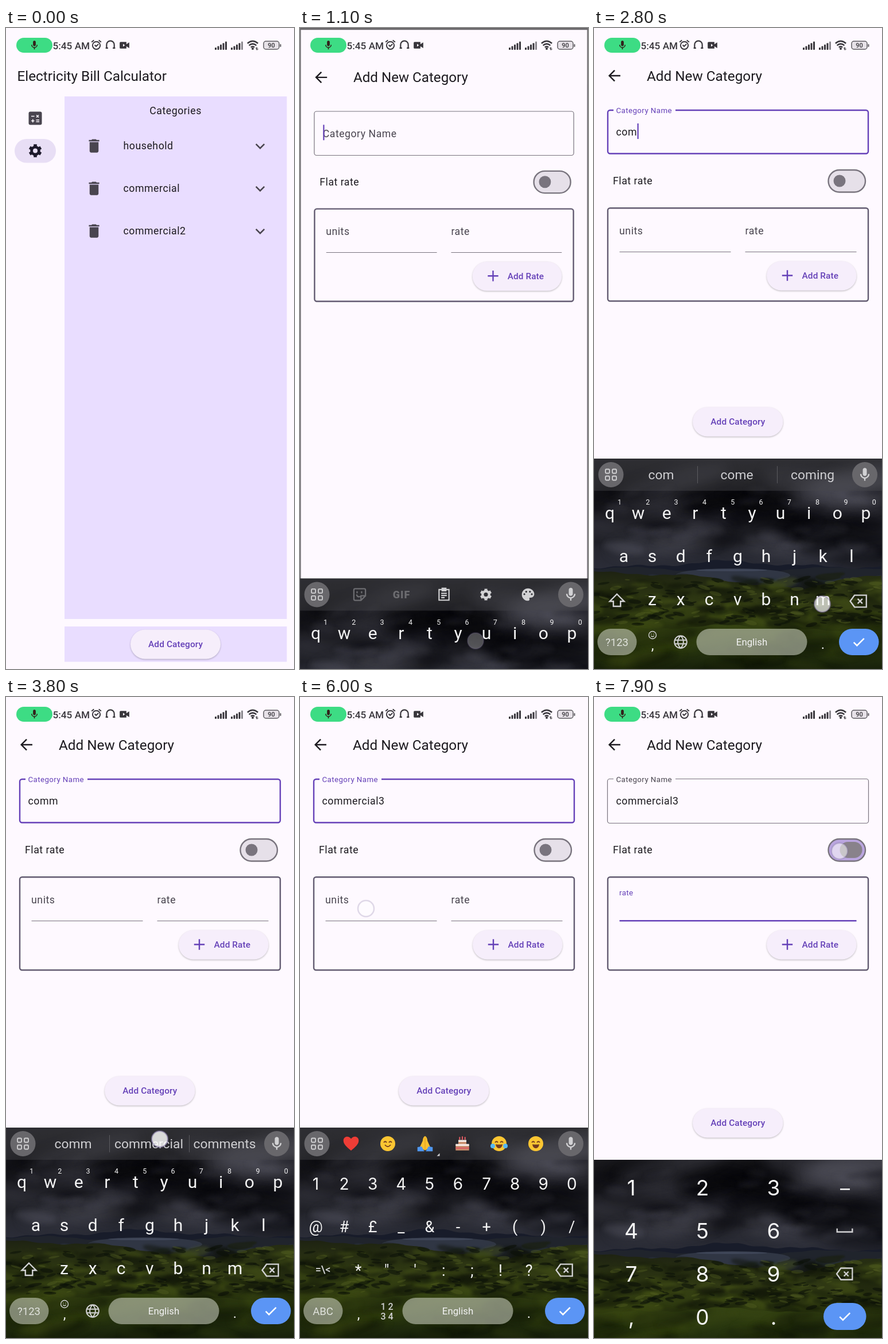
An HTML page with a canvas that plays this animation: 502x1115 px, repeating every 8 s.

```html
<!DOCTYPE html>
<html lang="en">
<head>
<meta charset="utf-8">
<title>Electricity Bill Calculator</title>
<style>
html, body { margin: 0; width: 100%; height: 100%; overflow: hidden; background: #fef9ff; }
canvas { display: block; }
</style>
</head>
<body>
<canvas id="stage" width="502" height="1115"></canvas>
<script>
const W = 502, H = 1115, LOOP = 8000, STEP = 100;
const BG = '#fef9ff', PANEL = '#e9ddff', PRIMARY = '#6541b8', INK = '#1d1b20', SOFT = '#49454f',
  OUTLINE = '#79747e', BOX = '#625b71', BUTTON = '#f6eefb', KEY = '#f4f4f4', DIM = '#6c6c70', LIGHT = '#d2d2d4';
const TITLE = 24.3, BODY = 17.7, SMALL = 13.3, SPACING = .55;
const stage = document.getElementById('stage').getContext('2d');
let c = stage;

const clamp = v => Math.max(0, Math.min(1, v));
const mix = (a, b, p) => a + (b - a) * p;
const ease = (t, start, length) => 1 - (1 - clamp((t - start) / length)) ** 2;

// Text is placed by the middle of its capitals.
function text(s, x, y, size, color, align = 'left', weight = 400, spacing = 0, family = 'Roboto') {
  c.font = `${weight} ${size}px ${family}, sans-serif`;
  c.letterSpacing = spacing + 'px';
  c.textAlign = align;
  c.fillStyle = color;
  c.fillText(s, x, y + size * .355);
}
const body = (s, x, y, color = INK, align) => text(s, x, y, BODY, color, align, 400, SPACING);

function box(x, y, w, h, r, fill, stroke, width = 1) {
  c.beginPath();
  c.roundRect(x, y, w, h, r);
  if (fill) { c.fillStyle = fill; c.fill(); }
  if (stroke) { c.strokeStyle = stroke; c.lineWidth = width; c.stroke(); }
}
const disc = (x, y, r, fill, stroke, width) => box(x - r, y - r, 2 * r, 2 * r, r, fill, stroke, width);

// Icons use a 24-unit grid; a line width means stroke instead of fill.
function icon(d, x, y, size, color, width) {
  c.save();
  c.translate(x, y);
  c.scale(size / 24, size / 24);
  c.translate(-12, -12);
  const path = new Path2D(d);
  if (width) { c.strokeStyle = color; c.lineWidth = width; c.stroke(path); }
  else { c.fillStyle = color; c.fill(path, 'evenodd'); }
  c.restore();
}
const TRASH = 'M6 19c0 1.1.9 2 2 2h8c1.1 0 2-.9 2-2V7H6zM19 4h-3.5l-1-1h-5l-1 1H5v2h14z';
const MIC = 'M12 14c1.7 0 3-1.3 3-3V5c0-1.7-1.3-3-3-3S9 3.3 9 5v6c0 1.7 1.3 3 3 3zM17 11a5 5 0 0 1-10 0H5c0 3.5 2.6 6.4 6 6.9V21h2v-3.1c3.4-.5 6-3.4 6-6.9z';
const PALETTE = 'M12 2a10 10 0 1 0 0 20c2 0 3-2 2-4 0-1 0-1 2-1 4 0 6-3 6-6 0-5-5-9-10-9zM6 10a1.5 1.5 0 1 0 .1 0zM9 6a1.5 1.5 0 1 0 .1 0zM15 6a1.5 1.5 0 1 0 .1 0zM18 10a1.5 1.5 0 1 0 .1 0z';
const CHECK = 'M4 12.5l5 5L20 6.5';
const BACKSPACE = 'M7 4.5H22V19.5H7L1.5 12zM11 9l6 6M17 9l-6 6';
const GLOBE = 'M2 12a10 10 0 1 0 20 0a10 10 0 1 0-20 0zM2.5 9H21.5M2.5 15H21.5M12 2C6 8 6 16 12 22C18 16 18 8 12 2';

function gear(x, y, size, color) {
  const r = size / 24;
  c.strokeStyle = color;
  c.lineWidth = 4.3 * r;
  c.beginPath();
  c.arc(x, y, 5.7 * r, 0, 7);
  c.stroke();
  c.lineWidth = 5 * r;
  for (let i = 0; i < 6; i++) {
    const a = (i + .5) * Math.PI / 3, dx = Math.cos(a) * r, dy = Math.sin(a) * r;
    c.beginPath();
    c.moveTo(x + 6.5 * dx, y + 6.5 * dy);
    c.lineTo(x + 10 * dx, y + 10 * dy);
    c.stroke();
  }
}

function pillButton(x, y, w, label, plus) {
  c.save();
  c.shadowColor = 'rgba(0,0,0,.24)';
  c.shadowBlur = 3;
  c.shadowOffsetY = 1.2;
  box(x, y - 25.5, w, 51, 25.5, BUTTON);
  c.restore();
  if (plus) icon('M12 3.5V20.5M3.5 12H20.5', x + 36, y - .5, 26, PRIMARY, 2.2);
  text(label, plus ? x + 61.5 : x + w / 2, y, 15.4, PRIMARY, plus ? 'left' : 'center', 500, .1);
}

function statusBar() {
  const ink = '#38363b';
  box(18, 17, 63, 26, 13, '#3ddc84');
  icon(MIC, 49.5, 30, 19, '#33211b');
  text('5:45 AM', 81.5, 30.5, 17.2, ink, 'left', 500);
  icon('M4 13a8 8 0 1 0 16 0a8 8 0 1 0-16 0zM8.5 12l3 3 5-5M2 6l5-4M22 6l-5-4', 157.5, 29.5, 20, ink, 2.3);
  icon('M4 18V12a8 8 0 0 1 16 0V18M2 19H7M17 19H22', 182, 29, 20, ink, 2.6);
  icon('M4 5H16V10L22 6V18L16 14V19H4Q2 19 2 17V7Q2 5 4 5zM9 9V15L13 12z', 206.5, 30, 20, ink);
  for (const x of [364, 392])
    for (let i = 0; i < 5; i++) box(x + i * 4.5, 34 - i * 2.6, 3, 4 + i * 2.6, 1, i > 3 && x > 380 ? '#8a878d' : ink);
  icon('M2 9.5Q12 1 22 9.5M5 13.5Q12 7.5 19 13.5M8.5 17Q12 14 15.5 17', 430, 29, 22, ink, 2.7);
  disc(430, 36, 2, ink);
  icon('M4 10L8 3V21M14 3V21L20 14', 437.5, 36, 6, ink, 4);
  box(449, 23, 27, 14, 4, '#e7e2e8', '#5d5b60', 1.5);
  box(477.5, 28, 2, 5, 1, '#5d5b60');
  text('90', 462.5, 30, 11, ink, 'center', 500);
}

function listPage() {
  box(0, 0, W, H, 0, BG);
  text('Electricity Bill Calculator', 19.5, 83, TITLE, INK);
  box(39.5, 145.5, 23, 23, 3, SOFT);
  icon('M5 8.5H10.5M14 6.5l4 4M18 6.5l-4 4M5 16.5H10.5M7.75 13.75V19.25M13.5 15H19M13.5 18H19', 51, 157, 24, BG, 1.7);
  box(15, 193, 72, 41.5, 21, '#e8def5');
  gear(51, 213.5, 27, '#1d192b');
  box(102, 119, 387.5, 909, 0, PANEL);
  box(102, 1041, 387.5, 61.5, 0, PANEL);
  body('Categories', 295.5, 144, INK, 'center');
  ['household', 'commercial', 'commercial2'].forEach((name, i) => {
    const y = 205 + i * 74;
    icon(TRASH, 153.5, y, 31, SOFT);
    body(name, 204.5, y);
    icon('M5 9l7 7 7-7', 443, y, 25, SOFT, 2.5);
  });
  pillButton(217, 1072, 157, 'Add Category');
}

const EDITS = [[0, ''], [2100, 'c'], [2450, 'co'], [2750, 'com'], [3000, 'comm'], [3950, 'commercial'], [5300, 'commercial3']];
const FOCUS_NAME = 1130, FOCUS_UNITS = 6100, FLAT = 7850;
const latest = (list, t) => list.filter(v => v <= t).pop();
const typed = t => EDITS.filter(e => e[0] <= t).pop()[1];
const cursorOn = t => Math.floor((t - latest([1000, ...EDITS.slice(1).map(e => e[0]), FOCUS_UNITS], t)) / 500) % 2 === 0;

function floating(s, x, rest, top, p, color) {
  const size = mix(BODY, SMALL, p);
  text(s, x, mix(rest, top, p), size, color, 'left', 400, size * .0315);
}
function underline(x, w, active) {
  box(x, active ? 388 : 389, w, active ? 2.4 : 1, 0, active ? PRIMARY : OUTLINE);
}

function toggle(t) {
  const p = clamp((t - FLAT) / 100), grow = Math.sin(Math.PI * p);
  box(408.5, 247, 64.5, 38.5, 19.5, p ? '#baa5df' : '#e6e0e9', OUTLINE, 2.4);
  const hw = 10.5 + 9 * grow, hh = 10.5 + 3.5 * grow;
  box(428 + 40 * p - hw, 266 - hh, 2 * hw, 2 * hh, hh, p ? '#89828b' : OUTLINE);
}

function formPage(t) {
  box(0, 0, W, H, 0, BG);
  icon('M20.5 12H4.5M12 4L4 12l8 8', 36, 83, 28, INK, 2.1);
  text('Add New Category', 92, 83, TITLE, INK);

  const inName = t >= FOCUS_NAME && t < FOCUS_UNITS, name = typed(t);
  const up = clamp((t - FOCUS_NAME) / 167);
  if (inName) box(24, 143, 454, 75.5, 4, null, PRIMARY, 2.4);
  else box(23.5, 142.5, 455, 77, 4, null, OUTLINE, 1.2);
  if (up) box(34, 139, 108 * up, 8, 0, BG);
  floating('Category Name', 38.5, 181, 143, up, inName ? PRIMARY : SOFT);
  body(name, 38.5, 181);
  const nameEnd = name ? 39 + c.measureText(name).width : 39;
  if (t >= 1000 && t < FOCUS_UNITS && cursorOn(t)) box(nameEnd, 166, 2.2, 27, 0, PRIMARY);

  body('Flat rate', 33, 266);
  toggle(t);

  box(24, 313.2, 454, 161.8, 4, null, BOX, 2.4);
  if (t >= FLAT) {
    underline(44.5, 413, true);
    floating('rate', 44, 353, 340, 1, PRIMARY);
  } else {
    const inUnits = t >= FOCUS_UNITS;
    underline(44.5, 194, inUnits);
    underline(263.5, 194);
    floating('units', 44, 353, 340, clamp((t - FOCUS_UNITS) / 167), inUnits ? PRIMARY : SOFT);
    body('rate', 263.5, 353, SOFT);
  }
  if (t >= FOCUS_UNITS && cursorOn(t)) box(45, 348, 2.2, 26, 0, PRIMARY);
  pillButton(301, 431, 156.5, 'Add Rate', true);
  pillButton(172, 1051 - 366 * ease(t, 1150, 250) + 56 * ease(t, 6150, 200), 157.5, 'Add Category');
}

// Dark clouds over a lake and green hills, painted once.
function paintScenery() {
  const canvas = document.createElement('canvas');
  canvas.width = W;
  canvas.height = 366;
  c = canvas.getContext('2d');
  let seed = 7;
  const random = () => (seed = seed * 16807 % 2147483647) / 2147483647;
  const gradient = (y0, y1, ...colors) => {
    const g = c.createLinearGradient(0, y0, 0, y1);
    colors.forEach((color, i) => g.addColorStop(i / (colors.length - 1), color));
    return g;
  };
  const blob = (x, y, w, h, color, tilt = 0) => {
    c.fillStyle = color;
    c.beginPath();
    c.ellipse(x, y, w, h, tilt, 0, 7);
    c.fill();
  };
  const scatter = (count, blur, y0, y1, size, colors) => {
    c.filter = `blur(${blur}px)`;
    for (let i = 0; i < count; i++) {
      const w = size * (.4 + random());
      blob(random() * W, mix(y0, y1, random()), w, w * (.15 + .2 * random()), colors[i % colors.length], random() * .6 - .3);
    }
    c.filter = 'none';
  };
  const ridge = (height, slope, amp, phase, fill) => {
    c.fillStyle = fill;
    c.beginPath();
    c.moveTo(0, 366);
    for (let x = 0; x <= W; x += 3)
      c.lineTo(x, height + slope * x + amp * (Math.sin(x / 63 + phase) + .5 * Math.sin(x / 25 + phase * 2) + .2 * Math.sin(x / 7)));
    c.lineTo(W, 366);
    c.fill();
  };
  box(0, 0, W, 366, 0, gradient(0, 195, '#1d1d21', '#17171b', '#1b1b21', '#25262d', '#2b2d38'));
  scatter(26, 10, 40, 165, 85, ['rgba(100,100,112,.24)', 'rgba(4,4,8,.36)']);
  scatter(60, 4, 50, 165, 30, ['rgba(105,105,118,.13)', 'rgba(4,4,8,.2)']);
  ridge(184, 0, 5, 1, '#181c2a');
  ridge(193, 0, 3, 4, '#20242c');
  blob(242, 203, 100, 12, '#303644');
  blob(240, 194, 62, 2, '#3f4658');
  scatter(16, 1, 203, 217, 18, ['#1c2119', '#2b3440']);
  ridge(194, .085, 4, 2, gradient(190, 290, '#1c2012', '#2c3512', '#36410f'));
  ridge(268, -.125, 4, 3, gradient(200, 300, '#252c12', '#3a4515'));
  ridge(252, .03, 5, 5, gradient(245, 310, '#374213', '#2a360f'));
  scatter(90, 2.5, 215, 292, 26, ['rgba(14,19,9,.5)', 'rgba(74,88,24,.42)', 'rgba(20,27,11,.5)']);
  scatter(200, .7, 208, 290, 9, ['rgba(11,16,8,.6)', 'rgba(84,97,34,.4)', 'rgba(14,20,9,.6)']);
  ridge(293, .008, 4, 1, gradient(285, 366, '#364413', '#28360f', '#18210b'));
  scatter(50, 4, 300, 366, 45, ['rgba(70,84,24,.16)', 'rgba(10,15,6,.25)']);
  c = stage;
  return canvas;
}
const scenery = paintScenery();

function face(x, y, open, tears) {
  const brown = '#713a20';
  disc(x, y, 13, '#fcc632');
  if (open) icon('M6 13Q12 14 18 13Q17 20 12 20Q7 20 6 13z', x, y, 24, brown);
  else icon('M7 14Q12 20 17 14', x, y, 24, brown, 1.8);
  icon('M5 10Q7.5 6.5 10 10M14 10Q16.5 6.5 19 10', x, y, 24, brown, 1.8);
  if (tears) for (const side of [-11, 11]) disc(x + side, y + 4, 4, '#55b7f2');
}
function emojis(y) {
  icon('M12 22C6 17 1 13 1 7.5C1 1 9 0 12 5C15 0 23 1 23 7.5C23 13 18 17 12 22z', 89, y, 29, '#ee3d36');
  face(153, y);
  icon('M12 1Q9 2 8.5 8L4 18 11 21H13L20 18 15.5 8Q15 2 12 1z', 218, y, 29, '#fbc02d');
  icon('M1 17L7 16 11 23H1zM23 17L17 16 13 23H23z', 218, y, 29, '#4f97ef');
  icon('M12 3V22', 218, y, 29, '#d99a23', .8);
  icon('M24 0V24H0z', 241, y + 19, 5, LIGHT);
  icon('M2 13H22V22H2zM6 7H18V13H6z', 283, y, 28, '#c98d6b');
  icon('M2 14H22M6 8H18', 283, y, 28, '#f6e9e2', 3);
  icon('M2 18.5H22M8 6V2M12 6V1M16 6V2', 283, y, 28, '#dc5a62', 1.8);
  face(347, y, true, true);
  face(411, y, true);
}

const GUESSES = { c: ['c', 'can', 'come'], co: ['co', 'come', 'could'], com: ['com', 'come', 'coming'], comm: ['comm', 'commercial', 'comments'] };
function toolStrip(t, y) {
  const words = typed(t);
  box(0, y - 28, W, 56, 0, 'rgba(70,70,74,.42)');
  for (const x of [29.5, 472]) disc(x, y, 22, '#68676b');
  for (const dx of [-6, 6]) for (const dy of [-6, 6]) box(29.5 + dx - 3.5, y + dy - 3.5, 7, 7, 1.5, null, LIGHT, 1.8);
  icon(MIC, 472, y, 28, LIGHT);
  if (!words) {
    icon('M5 3H19Q21 3 21 5V14L14 21H5Q3 21 3 19V5Q3 3 5 3zM14 21V14H21M7 12Q9 17 13 15M8 7V10M15 7V10', 104, y, 27, DIM, 2);
    text('GIF', 177, y, 18, DIM, 'center', 900, 1);
    icon('M4 4H20V21H4zM9 2H15V6H9zM7.5 10H16.5M7.5 13.5H16.5M7.5 17H13', 251, y, 26, LIGHT, 2);
    gear(324, y, 24, LIGHT);
    icon(PALETTE, 397.5, y, 26, LIGHT);
  } else if (GUESSES[words]) {
    GUESSES[words].forEach((word, i) => text(word, 117 + 132 * i, y, 22.8, '#cfcfd2', 'center'));
    for (const x of [180, 319]) box(x, y - 15, 1, 30, 0, 'rgba(255,255,255,.2)');
  } else emojis(y);
}

const PRESSES = [['c', 2000, 200.5, 995], ['o', 2350, 424, 846], ['m', 2650, 399, 995], ['m', 2900, 399, 995], ['3', 5200, 126, 846]];
const pressed = t => PRESSES.find(p => t >= p[1] && t < p[1] + 100);

function keyRow(keys, x, y, size, t, gap = 49.6, family) {
  const now = pressed(t);
  [...keys].forEach((k, i) =>
    text(k, x + gap * i, y, size, now && now[0] === k ? 'rgba(255,255,255,.35)' : KEY, 'center', 400, 0, family));
}
function enterKey(x, y, w, h) {
  box(x, y - h / 2, w, h, h / 2, '#5b95f5');
  icon(CHECK, x + w / 2, y, 27, '#fff', 2.2);
}

function wordKeys(t) {
  const symbols = t >= 4800, pale = 'rgba(190,195,180,.62)';
  if (symbols) {
    keyRow('1234567890', 27.5, 847, 28, t, 49.6, 'Inter');
    keyRow('@#£_&-+()/', 27.5, 921, 27, t);
    keyRow('*"\':;!?', 101.5, 997, 27, t);
    text('=\\<', 40, 996, 18, LIGHT, 'center', 500);
    text('1 2', 151.5, 1060, 16, LIGHT, 'center', 500);
    text('3 4', 151.5, 1077, 16, LIGHT, 'center', 500);
  } else {
    keyRow('qwertyuiop', 27.5, 843.5, 30, t);
    keyRow('1234567890', 44.5, 825, 12.5, 0, 49.3);
    keyRow('asdfghjkl', 52, 918.5, 30, t);
    keyRow('zxcvbnm', 101.5, 993.5, 30, t);
    icon('M12 3L22 13H17V20H7V13H2z', 40, 996, 30, LIGHT, 1.9);
    disc(102, 1056, 6.5, null, LIGHT, 1.4);
    icon('M7 14Q12 20 17 14M8 8V10M16 8V10', 102, 1056, 13, LIGHT, 2.5);
    icon(GLOBE, 151, 1068, 26, LIGHT, 1.8);
  }
  icon(BACKSPACE, 461, 997, 33, LIGHT, 1.7);
  box(6, 1045, 68.5, 46, 23, pale);
  text(symbols ? 'ABC' : '?123', 40, 1068, 18.5, '#e1e3dd', 'center');
  text(',', 102, 1073, 24, KEY, 'center');
  box(178.5, 1045, 193, 46, 23, pale);
  text('English', 275, 1068.5, 16.8, KEY, 'center');
  text('.', 399, 1071, 24, KEY, 'center');
  enterKey(427, 1068, 69.5, 46);
}

function numberKeys() {
  ['123', '456', '789', ',0.'].forEach((row, i) => keyRow(row, 65, 853.5 + 75 * i, 37, 0, 124, 'Inter'));
  box(429, 855, 17, 2.5, 0, KEY);
  icon('M1 9V14H23V9', 437, 928, 29, LIGHT, 2);
  icon(BACKSPACE, 437, 1003.5, 32, LIGHT, 1.7);
  enterKey(400, 1077.5, 74.5, 47);
}

function keyboard(t) {
  const numbers = t >= 6200;
  c.save();
  c.translate(0, 366 * (1 - ease(t, 1035, 265)));
  c.beginPath();
  c.rect(0, numbers ? 805 : 749, W, 366);
  c.clip();
  c.drawImage(scenery, 0, numbers ? 773 : 749);
  if (numbers) numberKeys();
  else {
    toolStrip(t, 777);
    wordKeys(t);
  }
  c.restore();
  const key = pressed(t);
  if (key) {
    const y = key[3] - 70;
    disc(key[2], y, 34, 'rgba(67,70,75,.96)');
    text(key[0], key[2], y - 1, 30, KEY, 'center');
    for (const dx of [-5, 0, 5]) disc(key[2] + dx, y + 23, 1.3, KEY);
  }
}

const TOUCHES = [[306, 1066, 800, 900], [198, 1003, 2100, 2100], [424, 855, 2400, 2450], [398, 1002, 2700, 2750], [401, 1001, 3000, 3000],
  [268, 769, 3800, 3850], [35, 1095, 4700, 4700], [126, 856, 5300, 5300], [115, 368, 5800, 5850], [428, 268, 7800, 7800]];
function touches(t) {
  for (const [x, y, down, up] of TOUCHES) {
    if (t < down || t >= up + 300) continue;
    c.save();
    c.globalAlpha = 1 - clamp((t - up) / 300);
    disc(x, y, 14, 'rgba(255,255,255,.82)', 'rgba(130,115,165,.5)', 2.5);
    c.restore();
  }
}

function zoomed(scale, alpha, draw) {
  c.save();
  c.globalAlpha = alpha;
  c.translate(W / 2, H / 2);
  c.scale(scale, scale);
  c.translate(-W / 2, -H / 2);
  draw();
  c.restore();
}

function frame() {
  const t = Math.floor(performance.now() % LOOP / STEP) * STEP;
  const open = ease(t, 800, 375);
  if (open < 1) zoomed(1 + .05 * open, 1, listPage);
  if (open > 0) {
    box(0, 0, W, H, 0, `rgba(0,0,0,${.6 * open})`);
    zoomed(mix(.85, 1, open), clamp(open * 1.5), () => formPage(t));
    if (t >= 1035) keyboard(t);
  }
  statusBar();
  touches(t);
  requestAnimationFrame(frame);
}
frame();
</script>
</body>
</html>
```
